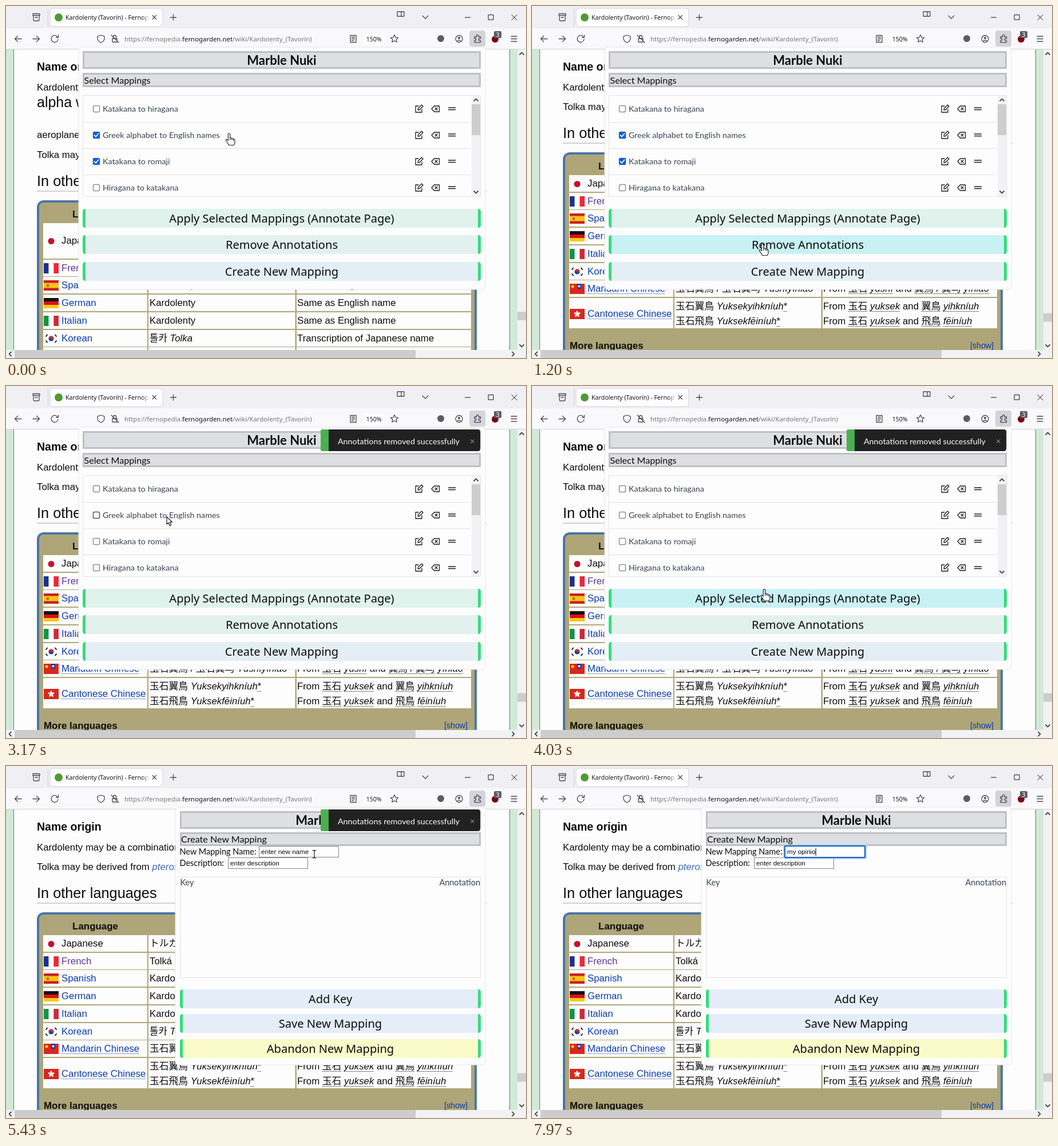
Write an HTML page that moves like this. It is 909 by 616 pixels and loops after 8 s.

```html
<!DOCTYPE html>
<html lang="en">
<head>
<meta charset="utf-8">
<title>Mapping popup</title>
<style>
html, body { margin: 0; width: 100%; height: 100%; overflow: hidden; background: #fdfdfd; }
svg { display: block; width: 100%; height: 100%; }
text { white-space: pre; }
.a { font-family: "Liberation Sans", Arial, "Noto Sans CJK JP", "Noto Sans CJK", sans-serif; }
.l { font-family: Lato, sans-serif; }
.n { font-family: "Noto Sans", sans-serif; }
.b { font-weight: bold; }
.i { font-style: italic; }
.m { text-anchor: middle; }
.e { text-anchor: end; }
</style>
</head>
<body>
<svg id="stage" viewBox="0 0 909 616" xmlns="http://www.w3.org/2000/svg"></svg>
<script>
const LOOP = 8000;
const INK = '#1b1b1f', GREY = '#4a4a55';
const $ = id => document.getElementById(id);
const rect = (x, y, w, h, fill, more = '') =>
  `<rect x="${x}" y="${y}" width="${w}" height="${h}" fill="${fill}" ${more}/>`;
const text = (x, y, s, size, cls, fill = '#0c0c0c', more = '') =>
  `<text x="${x}" y="${y}" font-size="${size}" class="${cls}" fill="${fill}" ${more}>${s}</text>`;
const line = (d, color = GREY, width = 1.3) =>
  `<path d="${d}" fill="none" stroke="${color}" stroke-width="${width}" stroke-linecap="round" stroke-linejoin="round"/>`;
const circle = (x, y, r, fill, more = '') => `<circle cx="${x}" cy="${y}" r="${r}" fill="${fill}" ${more}/>`;
const group = (id, body, more = '') => `<g id="${id}" ${more}>${body}</g>`;
const span = (cls, s) => `<tspan class="${cls}">${s}</tspan>`;

// ---------- browser frame ----------
function chrome() {
  const host = '<tspan fill="#15141a">fernogarden.net</tspan>';
  return rect(0, 0, 909, 40, '#f0f0f4') + rect(0, 39, 909, 37, '#f9f9fb') + rect(0, 75, 909, 1, '#d3d3db') +
    line('M47 13.500h12v3h-12zM48 16.500v7.500q0 2 2 2h6q2 0 2-2v-7.500M51 20h4') +
    rect(73, 4, 1, 32, '#cfcfd8') +
    rect(77, 4, 197, 32, '#fff', 'rx="4" stroke="#cfcfd8"') +
    circle(92, 20, 7, '#4f9a35') +
    text(104, 24, 'Kardolenty (Tavorín) - Fernopedia', 10.7, 'n', '#15141a', 'clip-path="url(#tabClip)"') +
    rect(238, 8, 13, 24, 'url(#fade)') +
    line('M256 16.500l6.500 6.500m0-6.500l-6.500 6.500M287.500 20h10m-5-5v10') +
    line('M684 10h12v8h-12zM691 10v8h5') + line('M728 17l5 5 5-5') +
    line('M802.500 20h9M843.500 15.500h8.500v8.500h-8.500zM884 15.500l9 9m0-9l-9 9', '#111', 1) +
    line('M27 57.500H15.500m5-5l-5 5 5 5M47 57.500h11.500m-5-5l5 5-5 5') +
    line('M90 54a6 6 0 1 0 1 4.500M91.500 51v4h-4') +
    line('M166 51l6 2.200v3.300q0 5-6 7.500q-6-2.500-6-7.500v-3.300z') +
    line('M186 57h8v6h-8zM187.500 57v-3a2.500 2.500 0 0 1 5 0v3M184 51l13 13') +
    text(207, 62, `https://fernopedia.${host}/wiki/Kardolenty_(Tavorín)`, 11.4, 'n', '#77777f') +
    line('M602 51.500h10v12h-10zM604.500 54.500h5m-5 3h5m-5 3h3') +
    rect(625, 48, 36, 19, '#fff', 'rx="3"') + text(643, 61.500, '150%', 10.5, 'n m', '#15141a') +
    line('M679 50.500l2 4.300 4.700.5-3.500 3.200 1 4.700-4.200-2.400-4.200 2.400 1-4.700-3.500-3.200 4.700-.5z') +
    circle(760, 57, 6, '#5b5b66') +
    circle(792, 57.500, 6, 'none', `stroke="${GREY}" stroke-width="1.300"`) + circle(792, 56, 2, GREY) + line('M788.500 61.500q3.500-3 7 0') +
    rect(810, 43, 28, 28, '#d4d4da', 'rx="4"') +
    line('M819 54h3.500v-1.500a1.800 1.800 0 0 1 3.600 0V54h3.400v3h-1.500a1.800 1.800 0 0 0 0 3.600h1.500v3H819v-3h1a1.800 1.800 0 0 0 0-3.600h-1z') +
    circle(855, 58, 6, '#800010') + rect(853, 44, 13, 12, '#5c5c66', 'rx="2"') + text(859.500, 53.500, '3', 10, 'n m', '#fff') +
    line('M883 53h10m-10 4.500h10m-10 4.500h10');
}

// ---------- flags, 26 x 18 ----------
const bars = (cols, vertical) => y => cols.map((c, i) => vertical
  ? rect(66 + i * 26 / 3, y, 26 / 3, 18, c)
  : rect(66, y + i * 6, 26, 6, c)).join('');
const flags = {
  jp: y => circle(79, y + 9.500, 5.500, '#c8102e'),
  fr: bars(['#1b2f95', '#fff', '#ed2939'], true),
  es: y => rect(66, y, 26, 18, '#c8201e') + rect(66, y + 4.500, 26, 9, '#fbc21a') + rect(71, y + 7, 4, 4.500, '#b06a2a'),
  de: bars(['#111', '#d8101c', '#f8c810']),
  it: bars(['#139246', '#fff', '#ce2b37'], true),
  kr: y => circle(79, y + 9, 4.500, '#1b458f') + `<path d="M74.500 ${y + 9}a4.500 4.500 0 0 1 9 0q-2 2-4.500 0t-4.500 0" fill="#c8303e"/>` +
    line(`M70 ${y + 5}l2-2.500M86 ${y + 2.500}l2 2.500M70 ${y + 13}l2 2.500M86 ${y + 15.500}l2-2.500`, INK, 2),
  cn: y => rect(66, y, 26, 18, '#d8281e') + rect(79, y, 7, 9, '#20389a') + circle(82.500, y + 4.500, 2, '#fff') + circle(71, y + 5, 2.500, '#f8d820'),
  hk: y => rect(66, y, 26, 18, '#d8281e') + [0, 1, 2, 3, 4].map(k =>
    `<ellipse cx="79" cy="${y + 6}" rx="1.600" ry="2.800" fill="#fff" transform="rotate(${k * 72} 79 ${y + 9})"/>`).join('')
};

// ---------- wiki page; dy shifts the section, tall adds height to the first row ----------
function wiki(dy, tall) {
  const body = (x, y, s, fill) => text(x, y, s, 16.8, 'a', fill);
  const blue = '#0b3bb0', same = 'Same as English name', name = 'Kardolenty';
  const u = s => span('u', s), ui = s => span('u i', s);
  const rows = [
    ['jp', 'Japanese', '#0c0c0c', 'トルカ ' + span('i', 'Tolka'), 'From pterosaur'],
    ['fr', 'French', '#5a3696', 'Tolká', 'From its Japanese name'],
    ['es', 'Spanish', blue, name, same],
    ['de', 'German', blue, name, same],
    ['it', 'Italian', blue, name, same],
    ['kr', 'Korean', blue, '톨카 ' + span('i', 'Tolka'), 'Transcription of Japanese name'],
    ['cn', u('Mandarin Chinese'), blue, '玉石翼鳥 / 玉石翼鸟 ' + span('i', 'Yùshíyìniǎo'),
      `From ${u('玉石')} ${ui('yùshí')} and ${u('翼鳥 / 翼鸟')} ${ui('yìniǎo')}`]
  ];
  const cells = (y, h) => rect(65, y, 182, h, '#fdfdfd') + rect(249, y, 256.500, h, '#fdfdfd') + rect(508, y, 305, h, '#fdfdfd');
  let out = text(54, 113, 'Name origin', 19.5, 'a b') + body(54, 148, 'Kardolenty may be a combination of');
  if (dy) out += text(54, 177, 'alpha wing', 25, 'a') + body(54, 231, 'aeroplane');
  out += body(54, 182 + dy, `Tolka may be derived from <tspan class="i" fill="#3a6cc0">pterosaur</tspan>`) +
    text(54, 231 + dy, 'In other languages', 25.3, 'a') + rect(54, 239.500 + dy, 786, 1, '#a2a9b1') +
    rect(56, 258 + dy, 765, 500, '#aea678', 'rx="10" stroke="#4a76a6" stroke-width="4"') +
    text(156, 286 + dy, 'Language', 16.9, 'a b m');
  rows.forEach(([flag, label, fill, mid, right], i) => {
    const y = Math.round(296 + dy + i * 30.700 + (i ? tall : 0));
    const extra = i ? 0 : tall, base = y + 20 + Math.floor(extra / 2);
    out += cells(y, 29 + extra) + flags[flag](base - 14) + body(97, base, label, fill) + body(251, base, mid) + body(509, base, right);
  });
  const y = 511 + dy + tall;
  const pair = (drop, word, sound) => body(251, y + drop, `玉石${word} ${span('i', 'Yuksek' + sound)}${u('*')}`) +
    body(509, y + drop, `From ${u('玉石')} ${ui('yuksek')} and ${u(word)} ${ui(sound)}`);
  return out + cells(y, 53) + flags.hk(y + 19) + body(97, y + 33, u('Cantonese Chinese'), blue) +
    pair(20, '翼鳥', 'yihkníuh') + pair(46, '飛鳥', 'fēiníuh') +
    text(66, y + 89, 'More languages', 16.9, 'a b') + text(766, y + 88, '[show]', 14.2, 'a', blue);
}

// Dotted rules below explained words, placed from the laid-out text
function underline(word) {
  const { x, y } = word.getStartPositionOfChar(0);
  const color = word.parentNode.getAttribute('fill');
  word.parentNode.insertAdjacentHTML('afterend',
    `<path d="M${x} ${Math.round(y) + 3.500}h${word.getComputedTextLength()}" stroke="${color}" stroke-dasharray="1 1"/>`);
}

function pageFrame() {
  return rect(0, 76, 14, 526, '#d2e9d8') + rect(880, 76, 14, 526, '#d2e9d8') +
    rect(13, 76, 1, 526, '#4f8a5c') + rect(880, 76, 1, 526, '#4f8a5c');
}
function scrollbars() {
  return rect(894, 76, 15, 526, '#f2f2f4') + rect(894, 535, 15, 15, '#cdcdcd', 'id="thumb"') +
    rect(0, 602, 909, 14, '#f2f2f4') + rect(15, 602, 701, 14, '#cdcdcd') +
    line('M898 85l3.500-3.500 3.500 3.500M898 593l3.500 3.500 3.500-3.500M9 605.500l-3.500 3.500 3.500 3.500M885 605.500l3.500 3.500-3.500 3.500', GREY, 1.8);
}

// ---------- popups ----------
const buttons = [];
function button(x, y, w, label, fill, hover, popup) {
  const id = 'btn' + buttons.length;
  buttons.push({ id, y, fill, hover, popup });
  return rect(x, y, w, 33, fill, `rx="4" id="${id}"`) +
    `<path d="M${x + 5} ${y}q-5 0-5 5v23q0 5 5 5zM${x + w - 5} ${y}q5 0 5 5v23q0 5-5 5z" fill="#34dd7c"/>` +
    text(x + w / 2, y + 24, label, 20.1, 'n m');
}
const panel = (x, w, h, id) => rect(x, 72, w, h, '#fdfdfe', `rx="5" stroke="#e6e6ee" id="${id}"`);
const bar = (x, y, w, h) => rect(x + 1.500, y + 1.500, w - 3, h - 3, '#dedfe3', 'stroke="#c0c0c2" stroke-width="3"');
const title = (x, w) => bar(x, 79, w, 31) + text(x + w / 2, 103, 'Marble Nuki', 22, 'l b m');

function mapRow(label, i) {
  const y = 180 + i * 46;
  return (i ? `<path d="M135 ${y - 22.500}H813" stroke="#c9c9c2" stroke-dasharray="1 1"/>` : '') +
    rect(152.500, y - 5.500, 11, 11, '#fff', `rx="2" stroke="#8f8f9d" stroke-width="1.500" id="box${i}"`) +
    group('tick' + i, rect(152, y - 6, 12, 12, '#0060df', `rx="2" id="fill${i}"`) +
      line(`M154.500 ${y}l2.500 2.800 4.500-5.500`, '#fff', 1.8)) +
    text(169, y + 5, label, 14.3, 'l', '#3a4453') +
    line(`M721 ${y - 5}h-5v11h11v-5M720 ${y + 2}l.5-3 6-6 2.500 2.500-6 6z`, INK) +
    line(`M748.500 ${y - 5}h9v10h-9l-4.500-5zM750 ${y - 2}l4 4m0-4l-4 4`, INK) +
    line(`M773.500 ${y - 2}h12m-12 3.500h12`, INK, 1.5);
}

function listPopup() {
  const labels = ['Katakana to hiragana', 'Greek alphabet to English names', 'Katakana to romaji', 'Hiragana to katakana'];
  const actions = [
    ['Apply Selected Mappings (Annotate Page)', '#e0f2ec'],
    ['Remove Annotations', '#e2f1ee'],
    ['Create New Mapping', '#e3eff4']
  ];
  return panel(127, 711, 424, 'panel1') + title(134, 696) + bar(134, 117, 696, 25) +
    text(136.500, 136, 'Select Mappings', 16.1, 'l') +
    rect(134.500, 156.500, 695, 177, '#fdfdfd', 'stroke="#e4e4ec"') + labels.map(mapRow).join('') +
    rect(814, 157, 15, 176, '#f2f2f4') + rect(814, 172, 15, 54, '#cdcdcd') +
    line('M818 166l3.500-3.500 3.500 3.500M818 324l3.500 3.500 3.500-3.500', GREY, 1.8) +
    actions.map(([label, fill], i) => button(134, 355 + Math.floor(i * 46.500), 696, label, fill, '#c8f1f4', 1)).join('');
}

function formPopup() {
  const field = (x, y, id, s) => rect(x + .5, y + .5, 139, 19, '#fff', 'stroke="#85858c"') +
    text(x + 4, y + 14, s, 11.6, 'a', '#0c0c0c', `id="${id}"`);
  return title(304, 526) + bar(304, 116, 526, 24) + text(306, 134, 'Create New Mapping', 16.1, 'l') +
    text(303.500, 155, 'New Mapping Name:', 14.5, 'l') + text(303.500, 174.500, 'Description:', 14.5, 'l') +
    field(442, 140, 'name', '') + field(388, 160, 'desc', 'enter description') +
    group('ring', rect(440.500, 138.500, 143, 23, 'none', 'rx="3" stroke="#a9cdf6" stroke-width="3"') +
      rect(442, 140, 140, 20, 'none', 'rx="1" stroke="#1461b8" stroke-width="2"') + rect(446, 144, 1, 13, '#000', 'id="caret"')) +
    rect(304.500, 194.500, 525, 176, '#fdfdfd', 'stroke="#e2e2e8"') +
    text(304.500, 209, 'Key', 14.5, 'l', '#3a4453') + text(829, 209, 'Annotation', 14.5, 'l e', '#3a4453') +
    button(304, 391, 526, 'Add Key', '#e4edf8', '#c9effb', 2) +
    button(304, 434, 526, 'Save New Mapping', '#e4edf8', '#c9effb', 2) +
    button(304, 478, 526, 'Abandon New Mapping', '#fafbc9', '#f4f79a', 2);
}

const toast = () => rect(550, 76, 279, 38, '#212121', 'rx="4"') +
  '<path d="M564 76h-10q-4 0-4 4v30q0 4 4 4h10z" fill="#4caf50"/>' +
  text(580, 101.500, 'Annotations removed successfully', 14.25, 'l', '#fff') +
  line('M812.500 94l5.500 5.500m0-5.500l-5.500 5.500', '#c4c4c4', 1);

const cursors = () => {
  const ink = 'fill="#fff" stroke="#222" stroke-width="1.200" stroke-linejoin="round"';
  return group('hand', `<path d="M-1.700 1.500q0-1.500 1.700-1.500t1.700 1.500V8q2.500-1 3 1 2.300-.8 2.800 1 2.500-.3 2.500 2v3.500q0 2.500-1.800 5H-.5q-1-2.500-3-5l-2-3q-.8-2 1-2 1 0 2.800 2z" ${ink}/><path d="M1.700 8v4M4.700 9v3M7.500 10v3" stroke="#222"/>`) +
    group('arrow', `<path d="M0 0V13l3-2.800 2.200 5.300 2.300-1-2.200-5.200H9.500z" ${ink}/>`) +
    group('ibeam', line('M-3-6.500h2l1 1 1-1h2M0-6V6.500M-3 7h2l1-1 1 1h2', '#111', 1.2));
};

$('stage').innerHTML = `<defs>
  <clipPath id="tabClip"><rect x="100" y="6" width="151" height="30"/></clipPath>
  <clipPath id="pageClip"><rect x="14" y="76" width="866" height="526"/></clipPath>
  <clipPath id="popClip"><rect id="pop" y="72"/></clipPath>
  <linearGradient id="fade"><stop stop-color="#fff" stop-opacity="0"/><stop offset="1" stop-color="#fff"/></linearGradient>
  </defs>` + rect(0, 0, 909, 616, '#fdfdfd') + pageFrame() +
  group('noted', wiki(84, 33), 'clip-path="url(#pageClip)"') + group('plain', wiki(0, 0), 'clip-path="url(#pageClip)"') +
  scrollbars() + chrome() + group('list', listPopup()) +
  group('form', panel(296, 542, 451, 'panel2') + group('formBody', formPopup(), 'clip-path="url(#popClip)"') +
    group('popBar', rect(822, 72, 15, 424, '#f2f2f4') + rect(822, 88, 15, 391, '#cdcdcd') + line('M825.500 81l3.500-3.500 3.500 3.500', GREY, 1.8))) +
  `<g clip-path="url(#popClip)">${group('toast', toast())}</g>` + group('cursor', cursors());
document.querySelectorAll('.u').forEach(underline);

// ---------- timeline ----------
const CLEAR = 1130, OPEN = 4695, SIZED = 4790, FOCUS = 6500;
const path = [
  [70, 390, 223], [870, 402, 411], [1000, 403, 416], [1230, 403, 416], [1580, 264, 274], [1780, 264, 274],
  [2230, 279, 230], [2500, 279, 230], [2900, 281, 229], [3600, 281, 229], [4400, 505, 456], [4530, 506, 457],
  [4800, 506, 457], [5380, 539, 154], [5530, 539, 154], [5570, 541, 154], [5770, 541, 154], [6070, 537, 154]
];
const typed = 'my opinio', keys = [6730, 6870, 7000, 7230, 7525, 7625, 7725, 7895, 7960];
const ease = k => k * k * (3 - 2 * k);
const ramp = (t, from, to) => ease(Math.min(1, Math.max(0, (t - from) / (to - from))));
const show = (id, on) => $(id).style.display = on ? '' : 'none';
const set = (id, attrs) => { for (const k in attrs) $(id).setAttribute(k, attrs[k]); };

function pointer(t) {
  const n = path.findIndex(p => p[0] > t);
  if (n === 0) return path[0].slice(1);
  if (n < 0) return path[path.length - 1].slice(1);
  const [t0, x0, y0] = path[n - 1], [t1, x1, y1] = path[n], k = ramp(t, t0, t1);
  return [x0 + (x1 - x0) * k, y0 + (y1 - y0) * k];
}

function draw(t) {
  const open = t >= OPEN, sizing = open && t < SIZED, popup = open ? 2 : 1;
  show('noted', t < CLEAR);
  show('plain', t >= CLEAR);
  set('thumb', { y: t < CLEAR ? 535 : 537.500 });
  show('list', !open);
  show('form', open);
  show('popBar', sizing);
  const left = open ? 296 : 127, height = open && !sizing ? 451 : 424;
  set('pop', { x: left, width: (sizing ? 822 : 838) - left, height });
  set('panel2', { height });

  const [x, y] = pointer(t);
  let onButton = false;
  for (const b of buttons) {
    const over = b.popup === popup && y >= b.y && y < b.y + 33;
    onButton = onButton || over;
    set(b.id, { fill: over ? b.hover : b.fill });
  }
  const checked = [false, t < 2650, t < 1760, false];
  checked.forEach((on, i) => {
    const over = t > 1230 && Math.abs(y - (180 + i * 46)) < 12;
    show('tick' + i, on);
    set('fill' + i, { fill: over ? '#1a73f0' : '#0060df' });
    set('box' + i, { stroke: over ? '#55555f' : '#8f8f9d' });
  });

  const inField = open && x > 442 && x < 582 && y > 140 && y < 160;
  const hand = onButton || t < 1000;
  set('cursor', { transform: `translate(${x} ${y})` });
  show('cursor', t < keys[0]);
  show('hand', hand);
  show('ibeam', inField);
  show('arrow', !hand && !inField);

  const shown = ramp(t, 1260, 1500) * (1 - ramp(t, 6520, 6800));
  set('toast', { opacity: shown, transform: `translate(0 ${-42 * (1 - shown)})` });

  const count = keys.filter(k => k <= t).length;
  $('name').textContent = count ? typed.slice(0, count) : 'enter new name';
  show('ring', t >= FOCUS);
  if (t >= FOCUS) set('caret', { x: 446 + $('name').getComputedTextLength() });
}

const start = performance.now();
function tick() {
  draw((performance.now() - start) % LOOP);
  requestAnimationFrame(tick);
}
tick();
</script>
</body>
</html>
```
